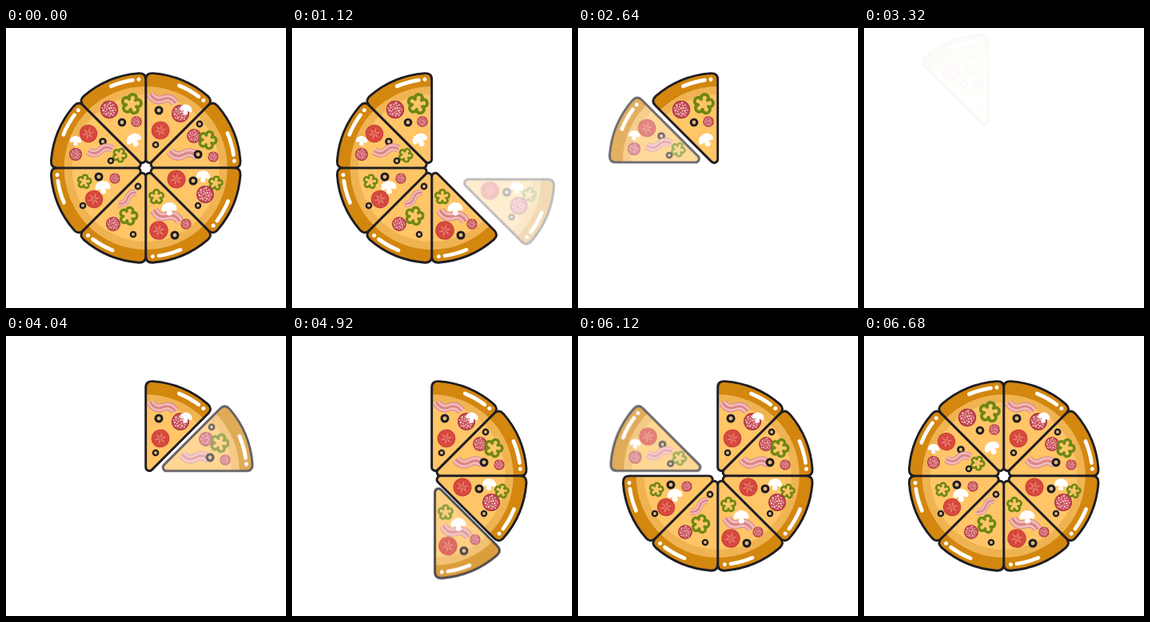
Write an HTML page that moves like this. It is 350x350 px and loops after 7 s.

```html
<!DOCTYPE html>
<html lang="en">
<head>
<meta charset="utf-8">
<title>Pizza loop</title>
<style>
  html, body { margin: 0; width: 100%; height: 100%; overflow: hidden; background: #fff; }
  svg { display: block; width: 350px; height: 350px; }
</style>
</head>
<body>
<svg id="stage" viewBox="0 0 350 350"></svg>
<script>
const LOOP = 7000, STEP = 1250 / 3, REACH = 54;
const CX = 174.7, CY = 174.9, RIM = 118.6;
const INK = '#1f1d23';

const stage = document.getElementById('stage');

function add(parent, tag, attrs = {}) {
  const el = document.createElementNS('http://www.w3.org/2000/svg', tag);
  for (const key in attrs) el.setAttribute(key, attrs[key]);
  parent.appendChild(el);
  return el;
}

// Point at a radius and a clockwise angle from straight up.
function polar(r, deg) {
  const a = deg * Math.PI / 180;
  return [r * Math.sin(a), -r * Math.cos(a)];
}
const pt = (r, deg) => polar(r, deg).map(v => v.toFixed(2)).join();

const SLICE = `M${pt(11, 0)} L${pt(110.5, 0)} Q${pt(RIM, 0)} ${pt(RIM, 4.2)}
  A${RIM},${RIM} 0 0 1 ${pt(RIM, 40.8)} Q${pt(RIM, 45)} ${pt(110.5, 45)}
  L${pt(11, 45)} A4.56,4.56 0 0 1 ${pt(11, 0)}Z`;

// Ring sector from beyond the rim down to an inner radius.
const band = r => `M${pt(126, -2)} A126,126 0 0 1 ${pt(126, 47)}
  L${pt(r, 47)} A${r},${r} 0 0 0 ${pt(r, -2)}Z`;

const arc = (r, a, b) => `M${pt(r, a)} A${r},${r} 0 0 1 ${pt(r, b)}`;

function place(parent, x, y, turn = 0, size = 1) {
  return add(parent, 'g', { transform: `translate(${x} ${y}) rotate(${turn}) scale(${size})` });
}

function line(parent, d, stroke, width, cap = 'round') {
  add(parent, 'path', {
    d, stroke, fill: 'none', 'stroke-width': width,
    'stroke-linecap': cap, 'stroke-linejoin': 'round'
  });
}

function dot(parent, [cx, cy], r, fill) {
  add(parent, 'circle', { cx, cy, r, fill });
}

const toppings = {
  olive(g, x, y, r) {
    dot(g, [x, y], r, INK);
    dot(g, [x, y], r * 0.45, '#e3b673');
  },
  salami(g, x, y, r) {
    const p = place(g, x, y, 0, r / 11);
    dot(p, [0, 0], 11, '#ab3544');
    dot(p, [0, 0], 9.6, '#c7505c');
    for (let i = 0; i < 24; i++)
      dot(p, polar(1.8 * Math.sqrt(i + 0.6), i * 137.5), i % 3 ? 0.9 : 1.2, '#f6c9c6');
  },
  tomato(g, x, y, r) {
    const p = place(g, x, y, 15, r / 11);
    dot(p, [0, 0], 11, '#c93c35');
    dot(p, [0, 0], 10, '#d84b40');
    for (let a = 0; a < 360; a += 60) {
      line(p, `M${pt(2, a)} L${pt(5.6, a)}`, '#e98475', 1.5);
      dot(p, polar(6.3, a + 30), 0.7, '#b93630');
    }
  },
  pepper(g, x, y, r, turn = 0) {
    const p = place(g, x, y, turn, r / 11);
    let d = `M${pt(6, 36)}`;
    for (let a = 36; a < 396; a += 72)
      d += ` C${pt(14.5, a + 8)} ${pt(14.5, a + 64)} ${pt(6, a + 72)}`;
    line(p, d + 'Z', '#6d8714', 3.4);
  },
  bacon(g, x, y, size, turn = 0) {
    const p = place(g, x, y, turn, size);
    const d = 'M-15,-3 Q-8,5 0,0 T15,2';
    for (const [color, width] of [['#d98a8e', 9.6], ['#f2bcb8', 7.6], ['#dc8589', 2.6]])
      line(p, d, color, width, 'butt');
  },
  mushroom(g, x, y, size, turn = 0) {
    const p = place(g, x, y, turn, size);
    add(p, 'path', {
      d: 'M-9.5,1 C-10,-4 -5,-8 0,-8 C5,-8 10,-4 9.5,1 C9,4 5,3 3,1.5 L3.5,7 Q0,10 -3.5,7 L-3,1.5 C-5,3 -9,4 -9.5,1Z',
      fill: '#fff'
    });
  }
};

// Slices clockwise from the top.
const menu = [
  [['bacon', 196, 89, 1.08, 10], ['olive', 191, 103, 5.5], ['salami', 218, 107, 11],
   ['mushroom', 225, 102, 0.8, 10], ['tomato', 193, 128, 11.3], ['olive', 187, 146, 4.3]],
  [['olive', 242, 120, 4.4], ['salami', 235, 135, 9], ['pepper', 252, 140, 11, 20],
   ['bacon', 222, 158, 1.15, 2], ['olive', 240, 158, 5.5], ['salami', 259, 161, 6.6]],
  [['tomato', 213, 189, 11.5], ['olive', 234, 191, 5.5], ['mushroom', 246.5, 185.5, 0.9, 5],
   ['pepper', 262, 194, 8.5, 10], ['salami', 249, 208, 11], ['olive', 240, 222, 4.2]],
  [['pepper', 188, 211, 9], ['bacon', 201, 235, 1.15, 14], ['mushroom', 204, 226, 1, -4],
   ['tomato', 191, 253, 11.7], ['salami', 225, 245, 6.6], ['olive', 211, 259, 5.5]],
  [['olive', 165, 198, 4.4], ['bacon', 152, 213, 0.85, -42], ['pepper', 153, 235, 11, 15],
   ['salami', 134, 245, 9], ['olive', 159, 258, 4.3]],
  [['pepper', 98, 192, 8.5, 10], ['olive', 116, 186, 5.5], ['tomato', 110, 214, 11.2],
   ['mushroom', 121, 199, 1, -4], ['salami', 136, 188, 6.6], ['olive', 96, 222, 4.3]],
  [['tomato', 103, 132, 11.2], ['mushroom', 87, 141, 0.75, 4], ['salami', 87, 158, 8],
   ['olive', 121, 142, 4.8], ['bacon', 118, 153, 1, -14], ['pepper', 142, 159, 8.5, 25],
   ['olive', 131, 166, 4.3]],
  [['salami', 129, 102, 11.2], ['pepper', 157, 95, 12.3, 10], ['olive', 145, 118, 5.3],
   ['salami', 163, 117, 6.8], ['mushroom', 160, 140, 1, -24]]
];

const clip = add(add(stage, 'defs'), 'clipPath', { id: 'slice' });
add(clip, 'path', { d: SLICE });

function bake(k) {
  const slice = add(stage, 'g');
  const base = place(slice, CX, CY, 45 * k);
  add(base, 'path', { d: SLICE, fill: '#ffc566' });
  const crust = add(base, 'g', { 'clip-path': 'url(#slice)' });
  add(crust, 'path', { d: band(92), fill: '#f0b352' });
  add(crust, 'path', { d: band(102), fill: '#d3870f' });
  line(base, arc(111, 22, 36.6), '#fff', 4.7);
  dot(base, polar(111, 40.5), 2.5, '#fff');
  for (const [kind, ...args] of menu[k]) toppings[kind](slice, ...args);
  line(place(slice, CX, CY, 45 * k), SLICE, INK, 2.9);
  return slice;
}

menu.forEach((_, k) => {
  const [dx, dy] = polar(REACH, 45 * k + 22.5);
  const home = { transform: 'translate(0px, 0px)', opacity: 1 };
  const away = { transform: `translate(${dx}px, ${dy}px)`, opacity: 0 };
  const at = (pose, step) => ({ ...pose, offset: step * STEP / LOOP });
  bake(k).animate([
    at(home, 0), at(home, k), at(away, k + 1),
    at(away, k + 8), at(home, k + 9), { ...home, offset: 1 }
  ], { duration: LOOP, iterations: Infinity });
});
</script>
</body>
</html>
```
